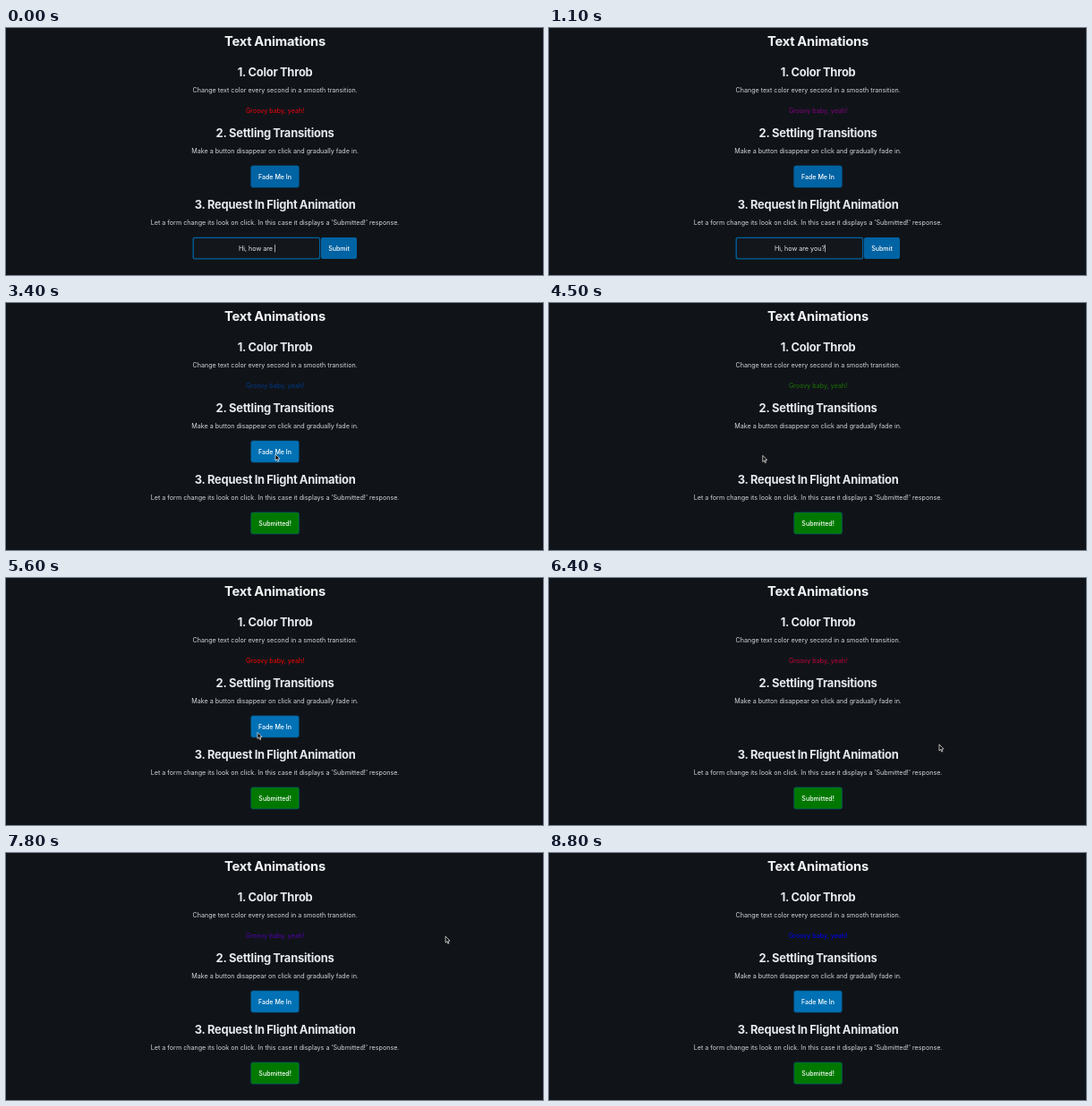
An HTML page with a canvas for the animation above (8.9 s loop, 600x276 px).

```html
<!DOCTYPE html>
<html lang="en">
<head>
<meta charset="utf-8">
<title>Text Animations</title>
<style>
  html, body { margin: 0; width: 100%; height: 100%; overflow: hidden; background: #101419; }
  canvas { display: block; width: 600px; height: 276px; }
</style>
</head>
<body>
<canvas id="stage"></canvas>
<script>
const LOOP = 8900, W = 600, H = 276, CENTER = 300.6;
const FONT = 'Inter, Roboto, sans-serif';
const BG = '#101419', BLUE = '#0063a3', BLUE_HOVER = '#0071b5', GREEN = '#007800';
const LIGHT = '#d2d6dc';

const canvas = document.getElementById('stage');
const ctx = canvas.getContext('2d');
const dpr = window.devicePixelRatio || 1;
canvas.width = W * dpr;
canvas.height = H * dpr;

const clamp = v => Math.min(1, Math.max(0, v));
const mix = (a, b, k) => a + (b - a) * k;
const smooth = k => k * k * (3 - 2 * k);

function text(str, x, y, color, size = 7.15, weight = 400) {
  const bold = weight === 700;
  ctx.font = `${weight} ${size}px ${FONT}`;
  ctx.letterSpacing = bold ? '-0.2px' : '0px';
  ctx.wordSpacing = bold ? '-0.5px' : '0px';
  ctx.textAlign = 'center';
  ctx.fillStyle = color;
  ctx.fillText(str, x, y);
}

function section(title, note, y) {
  text(title, CENTER, y, '#e6e9ed', 12.9, 700);
  text(note, CENTER, y + 18.6, LIGHT);
}

function box(x, y, w, h, fill, stroke, line = 1) {
  ctx.beginPath();
  ctx.roundRect(x, y, w, h, 2);
  ctx.fillStyle = fill;
  ctx.fill();
  if (!stroke) return;
  ctx.strokeStyle = stroke;
  ctx.lineWidth = line;
  ctx.stroke();
}

function button(label, x, y, w, fill, border) {
  box(x, y, w, 24, fill, border, 0.7);
  text(label, x + w / 2, y + 14.8, '#fff', 7.05, 500);
}

// Red, purple, blue, green: 1.5 s from each to the next
function throbColor(t) {
  const p = (t + 300) / 1500 % 4;
  const near = c => {
    const d = Math.abs(p - c);
    return smooth(clamp(1 - Math.min(d, 4 - d)));
  };
  const purple = 128 * near(1);
  return `rgb(${255 * near(0) + purple}, ${128 * near(3)}, ${255 * near(2) + purple})`;
}

// A click hides the button for a second, then it fades in over another
function drawFadeButton(t) {
  const click = t < 5800 ? 3500 : 5800;
  ctx.globalAlpha = t < click ? 1 : clamp((t - click - 1000) / 1000);
  const hot = t >= 3000;
  button('Fade Me In', 273.8, 154, 53.4, hot ? BLUE_HOVER : BLUE, hot ? '#0a578c' : BLUE);
  ctx.globalAlpha = 1;
}

function drawForm(t) {
  if (t >= 1900) {
    button('Submitted!', 273.8, 234, 53.6, GREEN, '#075c70');
    return;
  }
  const msg = 'Hi, how are ' + 'you?'.slice(0, t / 200);
  box(209.2, 234.4, 141.4, 23.4, '#13171c', '#0062a0', 1.3);
  text(msg, 280, 248.8, '#e6e9ed');
  ctx.fillRect(280 + ctx.measureText(msg).width / 2, 242, 0.7, 8.4);
  button('Submit', 352, 234, 40, BLUE);
}

// Pointer stops: arrival time, x, y; each is reached by a short eased move
const MOVE = 400;
const stops = [
  [2400, 299, 223], [3100, 301, 169], [4000, 199, 178], [4400, 238.8, 170.4],
  [5600, 281, 172.5], [6300, 436, 186], [7100, 453, 187.6], [7900, 498, 76]
];

function pointerAt(t) {
  let [, x, y] = stops[0];
  for (const [time, sx, sy] of stops) {
    const k = smooth(clamp((t - time + MOVE) / MOVE));
    x = mix(x, sx, k);
    y = mix(y, sy, k);
  }
  return [x, y];
}

const arrow = new Path2D('M0 0V7L1.6 5.6L2.7 8.2L3.8 7.7L2.7 5.2L4.9 5Z');
function drawPointer(t) {
  if (t < 2200 || t >= 8500) return;
  ctx.save();
  ctx.translate(...pointerAt(t));
  ctx.fillStyle = '#000';
  ctx.fill(arrow);
  ctx.strokeStyle = '#e6e6e6';
  ctx.lineWidth = 0.8;
  ctx.stroke(arrow);
  ctx.restore();
}

function draw(t) {
  ctx.setTransform(dpr, 0, 0, dpr, 0, 0);
  ctx.fillStyle = BG;
  ctx.fillRect(0, 0, W, H);

  text('Text Animations', CENTER, 19.7, '#f2f3f5', 14.7, 700);
  section('1. Color Throb', 'Change text color every second in a smooth transition.', 53.6);
  text('Groovy baby, yeah!', CENTER, 94.8, throbColor(t));
  section('2. Settling Transitions', 'Make a button disappear on click and gradually fade in.', 121.6);
  drawFadeButton(t);
  section('3. Request In Flight Animation',
    "Let a form change its look on click. In this case it displays a 'Submitted!' response.", 201.7);
  drawForm(t);
  drawPointer(t);
}

const start = performance.now();
function tick() {
  draw((performance.now() - start) % LOOP);
  requestAnimationFrame(tick);
}
tick();
</script>
</body>
</html>
```
